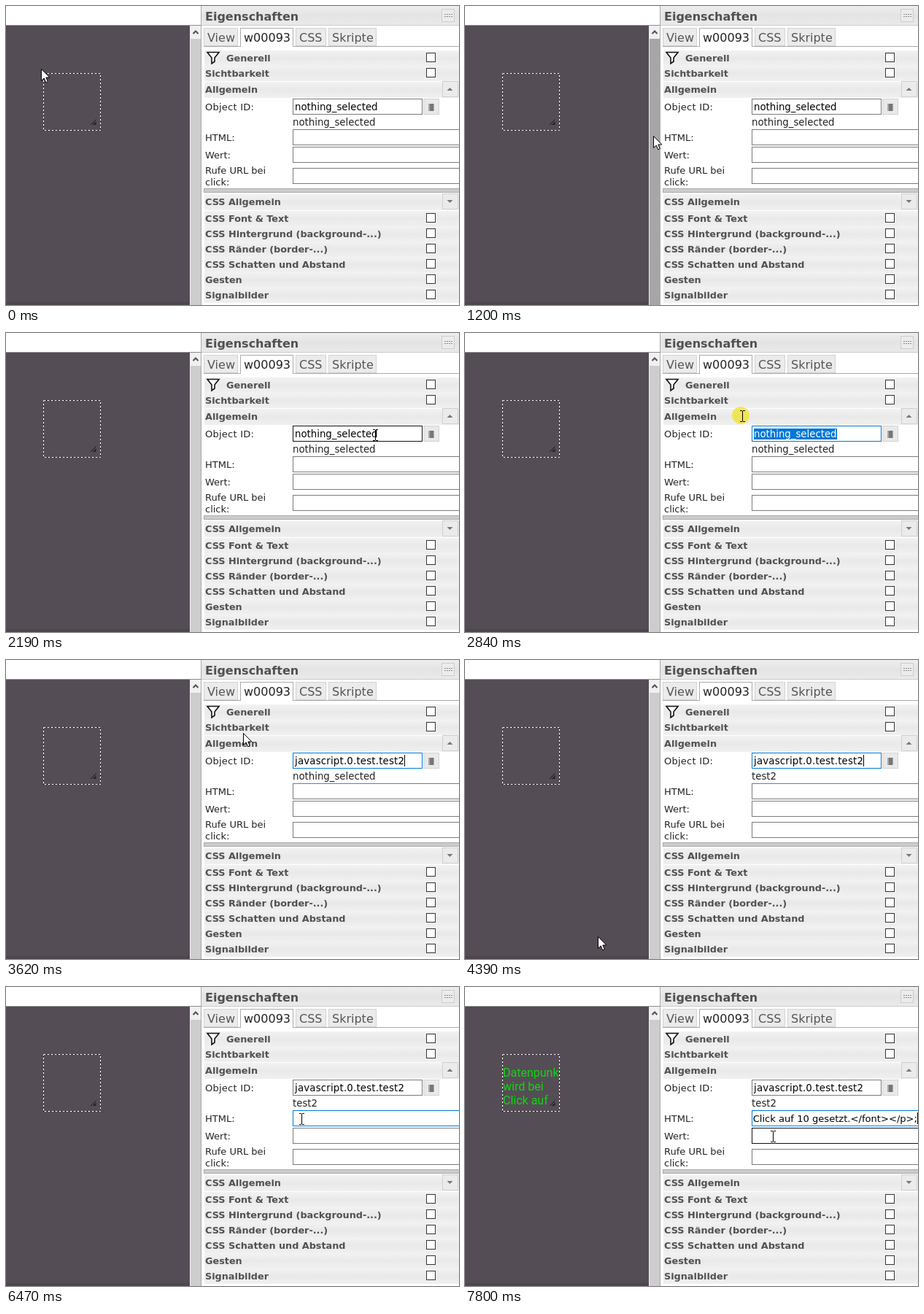
An HTML page with a canvas for the animation above (8000 ms loop, 621 by 410 pixels).

```html
<!DOCTYPE html>
<html lang="de">
<head>
<meta charset="utf-8">
<title>Eigenschaften</title>
<style>
html, body { margin: 0; width: 100%; height: 100%; overflow: hidden; background: #fff; }
canvas { display: block; }
</style>
</head>
<body>
<canvas id="stage" width="621" height="410"></canvas>
<script>
const c = document.getElementById('stage').getContext('2d');
const SANS = '"DejaVu Sans", sans-serif';
const LOOP = 8000, TICK = 109.7;

// Pointer path: tick, x, y
const PATH = [
  [0, 49, 86], [8, 49, 86], [9, 75, 96], [11, 259, 178], [13, 349, 230], [16, 430, 204],
  [17, 452, 178], [20, 506, 140], [22, 512, 138], [23, 512, 138], [26, 380, 114],
  [28, 338, 99], [31, 326, 100], [33, 326, 100], [39, 265, 192], [40, 183, 379],
  [54, 412, 179], [55, 403, 180], [57, 405, 181], [62, 405, 181], [69, 422, 205], [74, 422, 205]
];

function pointerAt(k) {
  const i = Math.max(1, PATH.findIndex(p => p[0] >= k));
  const [a, x, y] = PATH[i - 1], [b, u, v] = PATH[i];
  const f = (k - a) / (b - a);
  return { x: Math.round(x + (u - x) * f), y: Math.round(y + (v - y) * f) };
}

function rect(x, y, w, h, color) {
  c.fillStyle = color;
  c.fillRect(x, y, w, h);
}

function box(x, y, w, h, fill, border) {
  rect(x, y, w, h, border);
  rect(x + 1, y + 1, w - 2, h - 2, fill);
}

function text(s, x, y, color = '#222', font = '13px ' + SANS, spacing = 0) {
  c.font = font;
  c.letterSpacing = spacing + 'px';
  c.fillStyle = color;
  c.fillText(s, x, y);
}

function shape(points, fill, stroke, close = true) {
  c.beginPath();
  for (let i = 0; i < points.length; i += 2) c.lineTo(points[i], points[i + 1]);
  if (close) c.closePath();
  if (fill) { c.fillStyle = fill; c.fill(); }
  if (stroke) { c.strokeStyle = stroke; c.stroke(); }
}

function bar(y, h, label, x = 273) {
  const g = c.createLinearGradient(0, y, 0, y + h);
  g.addColorStop(0, '#f2f2f2');
  g.addColorStop(0.5, '#e9e9e9');
  g.addColorStop(1, '#f0f0f0');
  rect(272, y, 349, h, g);
  text(label, x, y + 15, '#505050', 'bold 12.8px ' + SANS);
}

function check(y) { box(576, y, 13, 13, '#fff', '#333'); }

function arrowButton(y, dir) {
  box(598, y, 22, 22, '#ebebeb', '#d0d0d0');
  const m = y + 11;
  shape([604.5, m - 2 * dir, 612.5, m - 2 * dir, 608.5, m + 2 * dir], '#777');
}

function canvasArea(k, p) {
  rect(0, 26, 268, 1, '#8a8a8a');
  rect(0, 27, 252, 383, '#554d55');
  rect(0, 406, 252, 4, '#4d464d');
  rect(252, 27, 15, 383, '#f0f0f0');
  rect(253, 45, 14, 365, p && p.x > 251 && p.x < 267 ? '#a6a6a6' : '#cdcdcd');
  c.lineWidth = 2;
  shape([256.5, 38, 260, 34.5, 263.5, 38], null, '#505050', false);
  rect(267, 0, 1, 410, '#aaa');

  if (k >= 63) {
    c.save();
    c.beginPath();
    c.rect(52, 93, 77, 77);
    c.clip();
    ['Datenpunkt', 'wird bei', 'Click auf'].forEach((s, i) =>
      text(s, 52, 123 + 19 * i, '#12d412', '16px Roboto, sans-serif'));
    c.restore();
  }
  c.lineWidth = 1;
  c.strokeStyle = '#000';
  c.strokeRect(51.5, 92.5, 78, 78);
  c.setLineDash([3, 2]);
  c.strokeStyle = '#fff';
  c.strokeRect(51.5, 92.5, 78, 78);
  c.setLineDash([]);
  shape([116, 163, 123.5, 155.5], null, '#181818', false);
  shape([123.5, 158, 123.5, 163, 118.5, 163], '#282428');
}

function header() {
  const g = c.createLinearGradient(0, 0, 0, 27);
  g.addColorStop(0, '#ededed');
  g.addColorStop(0.5, '#e4e4e4');
  g.addColorStop(1, '#eaeaea');
  rect(268, 0, 353, 26, g);
  rect(268, 26, 353, 1, '#ccc');
  text('Eigenschaften', 273, 20, '#505050', 'bold 16px ' + SANS);
  box(597, 4, 18, 18, '#ececec', '#ccc');
  for (let i = 0; i < 8; i++) rect(601 + 3 * (i % 4), 11 + 3 * (i >> 2), 2, 1, '#888');

  rect(271, 55, 350, 1, '#aaa');
  [['View', 271, 47], ['w00093', 321, 73], ['CSS', 397, 42], ['Skripte', 442, 66]].forEach(([s, x, w], i) => {
    const open = i === 1;
    box(x, 30, w, open ? 26 : 25, open ? '#fff' : '#ebebeb', open ? '#aaa' : '#d3d3d3');
    if (open) rect(x + 1, 55, w - 2, 1, '#fff');
    text(s, x + 5, 49, open ? '#222' : '#555', '16px ' + SANS);
  });
}

function sections() {
  bar(61, 21, 'Generell', 302);
  bar(82, 21, 'Sichtbarkeit');
  bar(104, 22, 'Allgemein');
  check(64);
  check(85);
  arrowButton(103, -1);
  c.lineWidth = 1.6;
  shape([276, 63.5, 292, 63.5, 286, 71, 286, 76, 282, 79, 282, 71], '#fff', '#111');

  text('Object ID:', 273, 143, '#222', '13px ' + SANS, 0.25);
  text('HTML:', 273, 185);
  text('Wert:', 273, 209);
  text('Rufe URL bei', 273, 230);
  text('click:', 273, 246);

  box(572, 127, 22, 22, '#e9e9e9', '#d3d3d3');
  rect(579, 134, 8, 10, '#aaa');
  rect(581, 134, 5, 10, '#777');

  box(271, 250, 351, 6, '#ccc', '#aaa');
  bar(258, 22, 'CSS Allgemein');
  arrowButton(257, 1);
  ['CSS Font & Text', 'CSS Hintergrund (background-...)', 'CSS Ränder (border-...)',
   'CSS Schatten und Abstand', 'Gesten', 'Signalbilder'].forEach((s, i) => {
    bar(281 + 21 * i, 21, s);
    check(284 + 21 * i);
  });
}

function field(y, h, w, focus, p) {
  const hover = p && p.x >= 393 && p.x < 393 + w && p.y >= y && p.y < y + h;
  box(393, y, w, h, '#fff', focus ? '#0078d7' : hover ? '#111' : '#7a7a7a');
}

function fields(k, p) {
  const input = '13.3px ' + SANS;
  const idFocus = k >= 22 && k < 51 || k === 54;
  field(127, 22, 178, idFocus, p);
  if (k < 30) {
    text('nothing_selected', 396, 143, '#000', input);
    if (k >= 24) {
      const x = Math.max(396, p.x);
      c.save();
      c.beginPath();
      c.rect(x, 131, 510 - x, 15);
      c.clip();
      rect(x, 131, 510 - x, 15, '#0078d7');
      text('nothing_selected', 396, 143, '#fff', input);
      c.restore();
    }
  } else {
    text('javascript.0.test.test2', 396, 143, '#000', input, 0.2);
    if (idFocus && Math.floor((k - 29) / 5) % 2 === 0) rect(546, 130, 1, 16, '#000');
  }
  text(k < 40 ? 'nothing_selected' : 'test2', 393, 164, '#222', input);

  field(169, 22, 240, k >= 55, p);
  if (k >= 62) {
    c.save();
    c.beginPath();
    c.rect(395, 171, 226, 18);
    c.clip();
    c.textAlign = 'right';
    text('Click auf 10 gesetzt.</font></p>;', 620, 185, '#000', '13.1px ' + SANS);
    c.textAlign = 'left';
    c.restore();
  }
  if (k >= 62) rect(620, 172, 1, 16, '#000');
  else if (k >= 55 && k < 59) rect(396, 172, 1, 16, '#000');
  field(193, 22, 240, false, p);
  field(222, 22, 240, false, p);
}

function pointer(k, p) {
  if (!p) return;
  const { x, y } = p;
  if (k >= 22 && k < 29 || k === 55 || k === 56) {
    c.fillStyle = 'rgba(240, 225, 40, .75)';
    c.beginPath();
    c.arc(x - 2, y - 1, 12, 0, 7);
    c.fill();
  }
  if (k >= 13 && k < 30 || k > 53) {
    rect(x, y - 7, 1, 14, '#000');
    for (const d of [-8, 7]) {
      rect(x - 3, y + d, 3, 1, '#000');
      rect(x + 1, y + d, 3, 1, '#000');
    }
  } else {
    const outline = [0, 0, 0, 16, 3.7, 12.5, 6.2, 18.3, 8.8, 17.2, 6.3, 11.5, 11.3, 11.5];
    c.lineWidth = 1;
    shape(outline.map((v, i) => v + (i % 2 ? y + 0.5 : x - 0.5)), '#fff', '#000');
  }
}

function draw(now) {
  const k = Math.floor((now % LOOP + 14) / TICK);
  const p = k >= 41 && k < 54 ? null : pointerAt(k);
  rect(0, 0, 621, 410, '#fff');
  canvasArea(k, p);
  header();
  sections();
  fields(k, p);
  if (k !== 70) pointer(k, p);
}

const start = performance.now();
function loop() {
  draw(performance.now() - start);
  requestAnimationFrame(loop);
}
loop();
</script>
</body>
</html>
```
